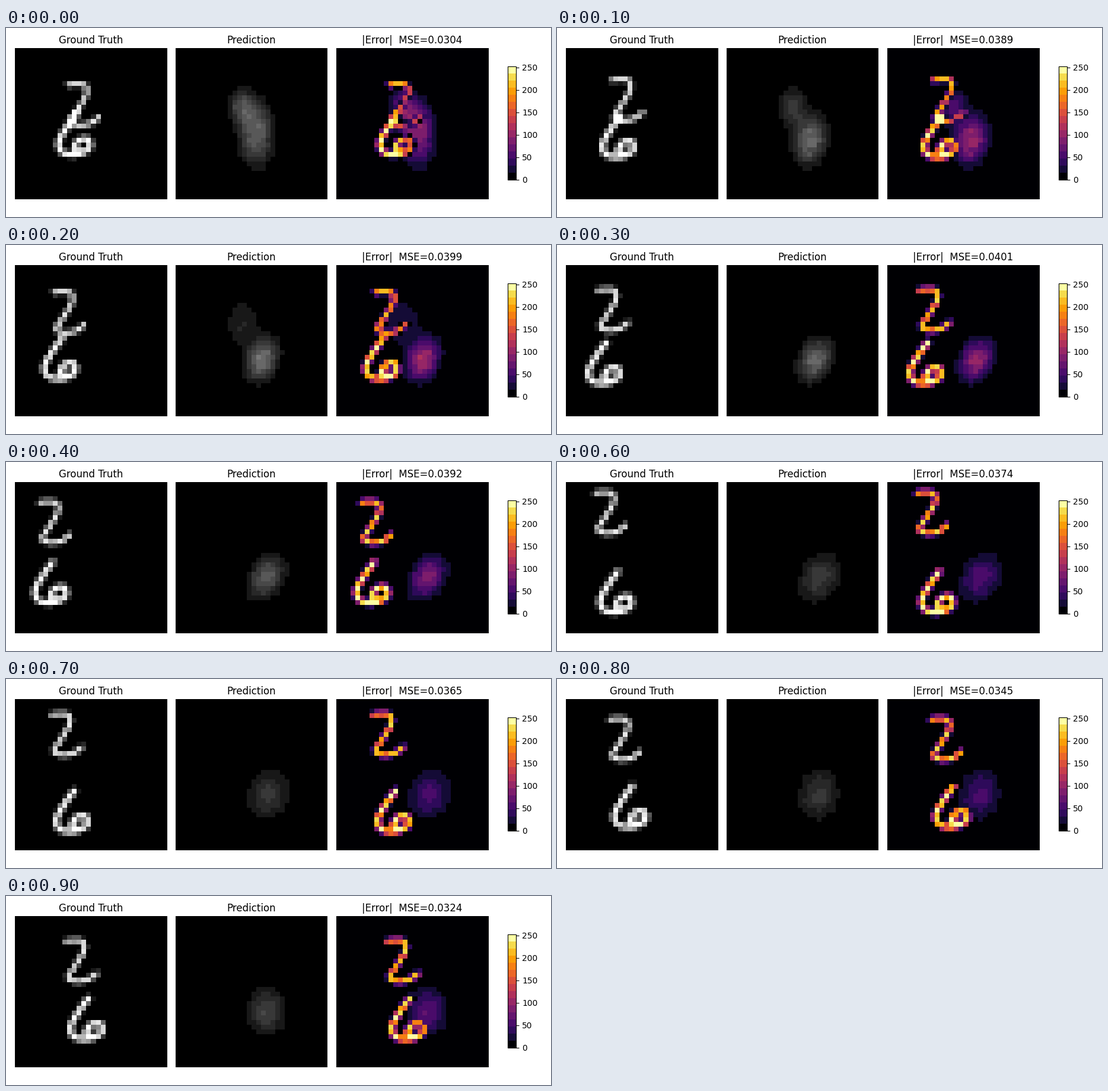
Animation, 919 px wide and 320 px high, one loop 1 s. Source, as a matplotlib script:

```python
import numpy as np
import matplotlib.pyplot as plt
from matplotlib.animation import FuncAnimation
from matplotlib.colors import ListedColormap

W, H, DPI = 919, 320, 100
N, FRAMES, INTERVAL = 32, 10, 100
VMAX, BANDS, SUB = 253, 16, 4
EDGE = 16  # faintest visible brightness

# Pen key points in grid cells, relative to each digit's top-left corner
TWO = [(0.7, 1.3), (2.6, 1.1), (4.4, 1.5), (4.5, 3.5), (2.4, 7), (1.2, 9),
       (3, 9.8), (5.4, 9.4), (7.1, 8.1)]
SIX = [(4.5, 0.4), (2.4, 3.3), (0.7, 6.5), (1.6, 8.6), (4.5, 9), (7.1, 7.7),
       (6.9, 5.8), (5, 6), (4, 7.8), (6, 8.5)]
MSE = [0.0304, 0.0389, 0.0399, 0.0401, 0.0392,
       0.0381, 0.0374, 0.0365, 0.0345, 0.0324]


def banded(name):
    levels = (np.arange(BANDS) + 0.5) / BANDS
    levels[0], levels[-1] = 0, 1
    return ListedColormap(plt.get_cmap(name)(levels))


def spline(points, steps=6):
    """Catmull-Rom curve through the key points."""
    p = np.array([points[0], *points, points[-1]], float)
    t = (np.arange(steps) / steps)[:, None]
    curve = [b + t * (c - a) / 2 + t**2 * (a - 2.5 * b + 2 * c - d / 2)
             + t**3 * (3 * b - a - 3 * c + d) / 2
             for a, b, c, d in zip(p, p[1:], p[2:], p[3:])]
    return np.vstack([*curve, p[-1:]])


def stroke(points, x0, y0, half_width):
    """Soft pen stroke averaged down to the N x N grid."""
    axis = (np.arange(N * SUB) + 0.5) / SUB
    gx, gy = np.meshgrid(axis - x0, axis - y0)
    dist = np.full(gx.shape, np.inf)
    path = spline(points)
    for (ax, ay), (bx, by) in zip(path, path[1:]):
        dx, dy = bx - ax, by - ay
        t = np.clip(((gx - ax) * dx + (gy - ay) * dy) / (dx * dx + dy * dy), 0, 1)
        dist = np.minimum(dist, np.hypot(gx - ax - t * dx, gy - ay - t * dy))
    ink = np.clip((half_width - dist) / 0.4 + 0.5, 0, 1)
    return ink.reshape(N, SUB, N, SUB).mean(axis=(1, 3)) * 255


def ground_truth(i):
    """Both digits travel at constant speed and bounce off the walls."""
    two_x = 3.5 + abs(1.5 * i - 7)
    two_y = np.floor(2.7 + 1.8 * abs(i - 6)) / 2
    six_x = 3 + abs(1.5 * i - 5.5)
    six_y = np.floor(38.61 - 1.7 * abs(i - 6.8)) / 2
    total = stroke(TWO, two_x, two_y, 0.47) + stroke(SIX, six_x, six_y, 0.6)
    return np.clip(total, 0, 255)


def glow(x, y, rx, ry, peak, shear=0):
    """Elliptic blob that falls from its peak to EDGE at the given radii."""
    if peak <= EDGE:
        return np.zeros((N, N))
    axis = np.arange(N) + 0.5
    dx, dy = np.meshgrid(axis - x, axis - y)
    r = np.hypot((dx + shear * dy) / rx, dy / ry)
    return peak * (EDGE / peak) ** r**2.3


def prediction(i):
    """An upper blob fades out while the main one settles, drifts and dims."""
    settle = np.exp(-i)
    upper = glow(13.9 + 0.1 * i, 12.4, 2.9, 4.2, 72 - 21 * i)
    main = glow(17 + 2.6 * np.sin(np.pi * i / 13), 20.2 - 2.2 * settle,
                4.2, 5.3 + 2.7 * settle,
                78 + 28 * np.cos(2 * np.pi * (i - 1.6) / 11),
                0.25 * np.sin(np.pi * i / 9))
    grain = np.random.default_rng(i).standard_normal((N, N))
    return (upper + main) * (1 + 0.06 * grain)


def place(x, y, w, h):
    """Axes from pixel coordinates measured from the top left."""
    return fig.add_axes([x / W, 1 - (y + h) / H, w / W, h / H])


def panel(x, width, title, cmap):
    ax = place(x, 34, width, 256)
    ax.axis("off")
    label = ax.set_title(title, fontsize=12)
    image = ax.imshow(np.zeros((N, N)), cmap=banded(cmap), vmin=0, vmax=VMAX,
                      aspect="auto", interpolation="nearest")
    return image, label


plt.rcParams["font.family"] = "DejaVu Sans"
fig = plt.figure(figsize=(W / DPI, H / DPI), dpi=DPI, facecolor="white")
truth_image, _ = panel(15, 256.5, "Ground Truth", "gray")
pred_image, _ = panel(286, 256, "Prediction", "gray")
error_image, error_title = panel(556.55, 256.5, "", "inferno")
fig.colorbar(error_image, cax=place(846.4, 64.6, 13.9, 192),
             ticks=range(0, 251, 50))


def update(i):
    truth, pred = ground_truth(i), prediction(i)
    truth_image.set_data(truth)
    pred_image.set_data(pred)
    error_image.set_data(np.abs(truth - pred))
    error_title.set_text(f"|Error|  MSE={MSE[i]:.4f}")
    return truth_image, pred_image, error_image, error_title


anim = FuncAnimation(fig, update, frames=FRAMES, interval=INTERVAL, repeat=True)
plt.show()
```
